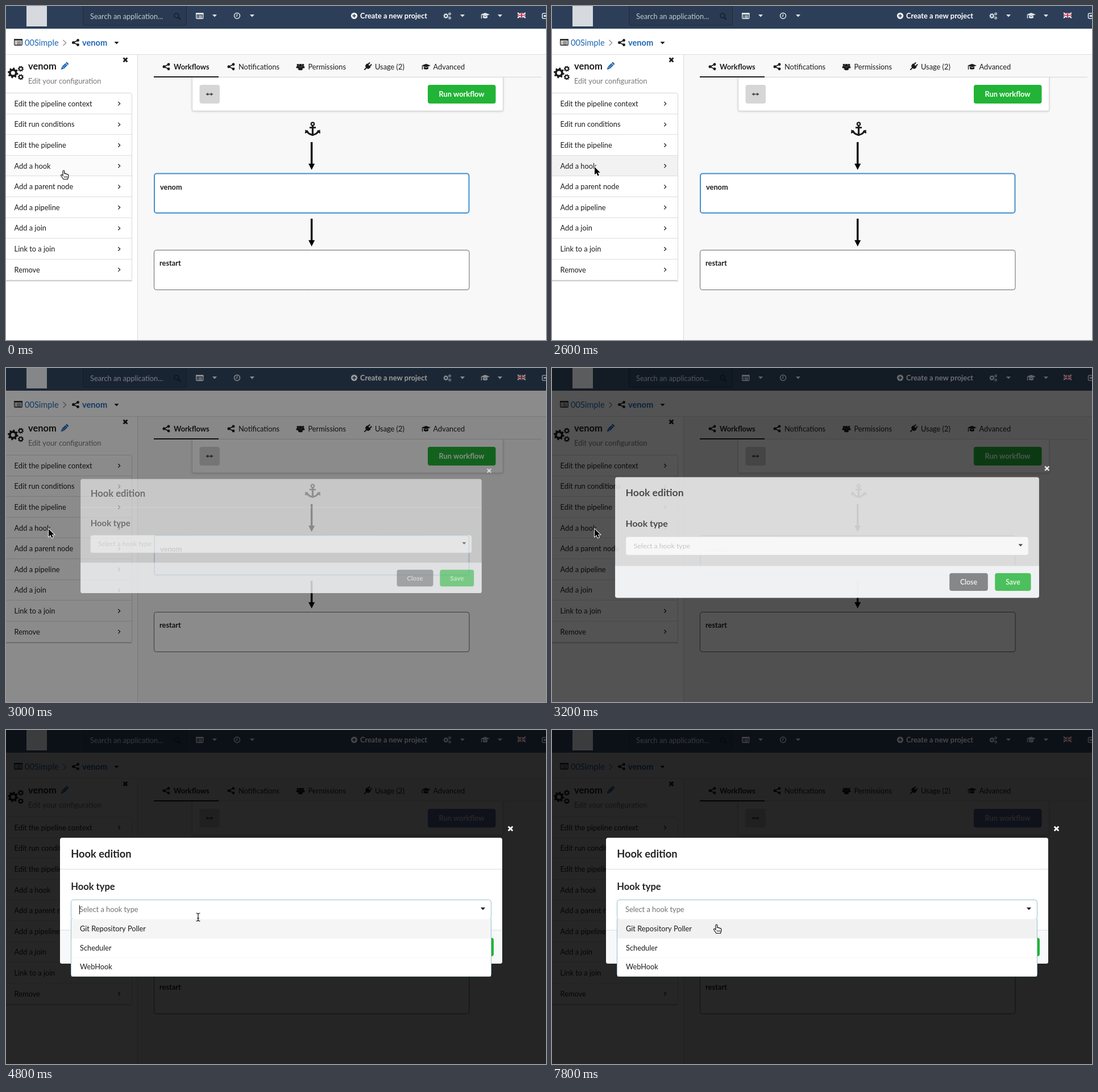
An HTML page with a canvas that plays this animation: 950 px wide and 589 px high, repeating every 8000 ms.

```html
<!DOCTYPE html>
<html lang="en">
<head>
<meta charset="utf-8">
<title>Workflow hook</title>
<style>
html, body { margin: 0; width: 100%; height: 100%; overflow: hidden; background: #f8f8f8; }
canvas { display: block; }
</style>
</head>
<body>
<canvas id="stage" width="950" height="589"></canvas>
<script>
const ctx = document.getElementById('stage').getContext('2d');
const LOOP = 8000, STEP = 200, TAU = Math.PI * 2;
const INK = '#1c1c1d', BLUE = '#1e66b4', GREEN = '#21b436', PALE = '#dfe4ea';
const MENU = ['Edit the pipeline context', 'Edit run conditions', 'Edit the pipeline', 'Add a hook',
  'Add a parent node', 'Add a pipeline', 'Add a join', 'Link to a join', 'Remove'];
const HOOKS = ['Git Repository Poller', 'Scheduler', 'WebHook'];
const ROW = 36.6;

// Pointer hot spot: time, x, y
const POINTER = [
  [0, 102, 290], [200, 101, 290], [1200, 75, 284], [3400, 75, 284], [4400, 336, 328],
  [4800, 338, 330], [5200, 325, 345], [5900, 303, 410], [6200, 300, 410], [6600, 297, 395],
  [7000, 294, 378], [7600, 290, 345], [7800, 290, 343], [8000, 290, 343]];

const clamp = v => Math.max(0, Math.min(1, v));

function pointerAt(t) {
  let i = 1;
  while (i < POINTER.length - 1 && POINTER[i][0] < t) i++;
  const [t0, x0, y0] = POINTER[i - 1], [t1, x1, y1] = POINTER[i];
  const u = clamp((t - t0) / (t1 - t0)), s = u * u * (3 - 2 * u);
  return [x0 + (x1 - x0) * s, y0 + (y1 - y0) * s];
}

function rect(x, y, w, h, color) {
  ctx.fillStyle = color;
  ctx.fillRect(x, y, w, h);
}

function box(x, y, w, h, r, fill, stroke, line = 1) {
  ctx.beginPath();
  ctx.roundRect(x, y, w, h, r);
  if (fill) { ctx.fillStyle = fill; ctx.fill(); }
  if (stroke) { ctx.strokeStyle = stroke; ctx.lineWidth = line; ctx.stroke(); }
}

function text(s, x, y, color = INK, size = 12.8, weight = 400, align = 'left') {
  ctx.font = `${weight} ${size}px Lato, sans-serif`;
  ctx.textAlign = align;
  ctx.fillStyle = color;
  ctx.fillText(s, x, y);
}

function path(points, color, fill = true, width = 1) {
  ctx.beginPath();
  for (let i = 0; i < points.length; i += 2) ctx.lineTo(points[i], points[i + 1]);
  if (fill) {
    ctx.closePath();
    ctx.fillStyle = color;
    ctx.fill();
  } else {
    ctx.strokeStyle = color;
    ctx.lineWidth = width;
    ctx.stroke();
  }
}

function dot(x, y, r, color) {
  ctx.beginPath();
  ctx.arc(x, y, r, 0, TAU);
  ctx.fillStyle = color;
  ctx.fill();
}

function ring(x, y, r, color, width) {
  ctx.beginPath();
  ctx.arc(x, y, r, 0, TAU);
  ctx.strokeStyle = color;
  ctx.lineWidth = width;
  ctx.stroke();
}

function at(x, y, draw, angle = 0) {
  ctx.save();
  ctx.translate(x, y);
  ctx.rotate(angle);
  draw();
  ctx.restore();
}

const caret = (x, y, color = INK) => path([x - 4, y - 2, x + 4, y - 2, x, y + 2.5], color);
const chevron = (x, y, r, color, w) => path([x - r / 2, y - r, x + r / 2, y, x - r / 2, y + r], color, false, w);

function cross(x, y, r, color) {
  path([x - r, y - r, x + r, y + r], color, false, 2.8);
  path([x + r, y - r, x - r, y + r], color, false, 2.8);
}

function gear(x, y, r, color) {
  ctx.beginPath();
  for (let i = 0; i < 32; i++) {
    const a = (i + .5) * TAU / 32, d = i % 4 < 2 ? r : r * .76;
    ctx.lineTo(x + d * Math.cos(a), y + d * Math.sin(a));
  }
  ctx.closePath();
  ctx.moveTo(x + r * .38, y);
  ctx.arc(x, y, r * .38, 0, TAU);
  ctx.fillStyle = color;
  ctx.fill('evenodd');
}

function gears(x, y, s, color) {
  gear(x - 4 * s, y, 9 * s, color);
  gear(x + 9 * s, y - 7 * s, 5 * s, color);
  gear(x + 9 * s, y + 7 * s, 5 * s, color);
}

function share(x, y) {
  path([x + 4, y - 4, x - 4, y, x + 4, y + 4], INK, false, 1.8);
  dot(x - 4, y, 2.5, INK);
  dot(x + 4, y - 4, 2.4, INK);
  dot(x + 4, y + 4, 2.4, INK);
}

function listIcon(x, y, w, h, color) {
  box(x + .7, y + .7, w - 1.4, h - 1.4, 1.5, null, color, 1.4);
  rect(x, y, w, 3, color);
  for (let i = 0; i < 3; i++) {
    const ly = y + 4.4 + i * (h - 5) / 3;
    rect(x + 2.5, ly, 1.5, 1.2, color);
    rect(x + 5, ly, w - 7.5, 1.2, color);
  }
}

function cap(x, y, color) {
  path([x - 8, y - 2, x, y - 5, x + 8, y - 2, x, y + 1], color);
  path([x - 4, y, x, y + 2, x + 4, y, x + 4, y + 4, x, y + 5, x - 4, y + 4], color);
  path([x - 6.5, y - 1, x - 6.5, y + 5], color, false, 1.4);
}

function users(x, y) {
  for (const [dx, dy, r] of [[-4.5, -3, 2], [4.5, -3, 2], [0, -2.2, 2.9]]) {
    dot(x + dx, y + dy, r, INK);
    box(x + dx - r - 1, y + dy + r, (r + 1) * 2, r * 1.9, 2, INK);
  }
}

function plug(x, y) {
  at(x, y, () => {
    rect(-3.2, -8, 2, 5, INK);
    rect(1.2, -8, 2, 5, INK);
    box(-4.5, -3.5, 9, 6.5, [0, 0, 4, 4], INK);
    rect(-1, 2, 2, 6, INK);
  }, Math.PI / 4);
}

function pencil(x, y) {
  at(x, y, () => {
    rect(-2.6, -8, 5.2, 2.6, BLUE);
    rect(-2.6, -4.6, 5.2, 8.4, BLUE);
    path([-2.6, 4.2, 2.6, 4.2, 0, 9], BLUE);
    rect(-.4, -4, .8, 7, '#8fb8e4');
  }, Math.PI / 4);
}

function anchor(x, y) {
  ring(x, y - 9, 2.7, INK, 2.2);
  rect(x - 1.6, y - 6, 3.2, 18, INK);
  rect(x - 5.5, y - 4, 11, 2.8, INK);
  ctx.beginPath();
  ctx.arc(x, y - 1, 11, .3, Math.PI - .3);
  ctx.strokeStyle = INK;
  ctx.lineWidth = 3;
  ctx.stroke();
  for (const d of [-1, 1]) path([x + d * 13.5, y + 8, x + d * 13, y + 1, x + d * 6.5, y + 5], INK);
}

function downArrow(x, top, tip) {
  rect(x - 1.7, top, 3.4, tip - top - 8, '#000');
  path([x - 5.5, tip - 11, x + 5.5, tip - 11, x, tip], '#000');
}

function header() {
  rect(0, 0, 950, 40, '#2d3f58');
  rect(36, 0, 36, 36, '#d6d9dd');
  box(135.5, -4, 182, 38, 3, '#293a52', '#1d2a3c');
  text('Search an application...', 148, 23, '#c3cad3');
  ring(300, 17, 4, '#141d2a', 1.5);
  path([303, 20, 307, 24], '#141d2a', false, 1.8);
  listIcon(334, 12, 13.5, 11, PALE);
  ring(406.5, 17.3, 5, PALE, 1.5);
  path([406.5, 14, 406.5, 18, 404, 18], PALE, false, 1.2);
  for (const x of [367, 433, 803, 869]) caret(x, 17, PALE);
  dot(612.5, 17.3, 5.6, '#fff');
  rect(609.3, 16.5, 6.4, 1.7, '#2d3f58');
  rect(611.7, 14.1, 1.7, 6.4, '#2d3f58');
  text('Create a new project', 623, 22, '#fff', 12.8, 700);
  gears(776, 17.5, .52, PALE);
  cap(843, 17, PALE);
  rect(900, 12, 14, 9, '#34427f');
  path([900, 12, 914, 21], '#fff', false, 2);
  path([914, 12, 900, 21], '#fff', false, 2);
  rect(905.2, 12, 3.6, 9, '#fff');
  rect(900, 14.8, 14, 3.4, '#fff');
  rect(906, 12, 2, 9, '#d0313f');
  rect(900, 15.6, 14, 1.8, '#d0313f');
  box(943.5, 13, 9, 9, 2, null, PALE, 1.6);
  rect(946, 16, 4, 3, PALE);
}

function breadcrumb() {
  rect(0, 40, 950, 45, '#fff');
  rect(0, 85, 950, 1, '#dedede');
  listIcon(14, 58, 15, 12, '#333');
  text('00Simple', 33, 70, BLUE, 14.6);
  chevron(103, 65, 5, '#999', 1.6);
  share(122.5, 64.5);
  text('venom', 134, 70, BLUE, 14.6, 700);
  caret(194.5, 65);
}

function sidebar(glow) {
  rect(0, 86, 231, 503, '#fff');
  rect(231, 86, 1, 503, '#d9d9d9');
  gears(16.5, 118, 1.05, INK);
  text('venom', 39, 112, INK, 16.5, 700);
  pencil(103, 106);
  cross(210, 95, 3.4, INK);
  text('Edit your configuration', 39, 137, '#777');
  rect(0, 484, 222, 1.5, '#ccc');
  box(-4, 153.5, 225.5, 330, 3, '#fff', '#d6d6d7');
  MENU.forEach((label, i) => {
    const y = 154 + i * ROW;
    if (i === 3) rect(0, y, 221, ROW, glow);
    if (i) rect(0, Math.round(y) - 1, 221, 1, '#dededf');
    text(label, 14.6, y + 22.7);
    chevron(199, y + 18.3, 3.3, '#222', 1.3);
  });
}

function workflow(dim) {
  rect(260, 125, 682, 1, '#d4d4d5');
  rect(260, 124, 114, 2, INK);
  share(282, 107);
  text('Workflows', 295, 112, INK, 12.8, 700);
  share(396, 107);
  text('Notifications', 409, 112);
  users(518, 107);
  text('Permissions', 531.5, 112);
  plug(636, 107);
  text('Usage (2)', 649, 112);
  cap(739, 107, INK);
  text('Advanced', 751.5, 112);

  ctx.save();
  ctx.beginPath();
  ctx.rect(320, 126, 562, 70);
  ctx.clip();
  ctx.shadowColor = 'rgba(0,0,0,.18)';
  ctx.shadowBlur = 4;
  ctx.shadowOffsetY = 1;
  box(327.5, 118, 547, 67, 4, '#fff');
  ctx.restore();
  ctx.beginPath();
  ctx.moveTo(327.5, 126);
  ctx.lineTo(327.5, 185);
  ctx.lineTo(874.5, 185);
  ctx.lineTo(874.5, 126);
  ctx.strokeStyle = '#d4d4d5';
  ctx.lineWidth = 1;
  ctx.stroke();
  box(340.5, 139, 35.5, 33, 4, '#d6d6d7');
  rect(354, 154.8, 8, 1.5, '#444');
  path([351.5, 155.5, 355.5, 152.8, 355.5, 158.2], '#444');
  path([364.5, 155.5, 360.5, 152.8, 360.5, 158.2], '#444');
  box(742, 139, 119.5, 33, 4, dim > .8 ? '#6a76b8' : GREEN);
  text('Run workflow', 801.5, 160, '#fff', 12.8, 700, 'center');

  anchor(539.5, 217);
  downArrow(537.7, 240, 289);
  box(261, 295.5, 553.5, 69.5, 4, '#fff', '#4290d0', 2);
  text('venom', 271, 323.5, INK, 12.8, 700);
  downArrow(537.7, 375, 424);
  box(260.5, 430.5, 554.5, 70, 4, '#fff', '#666');
  text('restart', 270, 458, INK, 12.8, 700);
}

function modal(open) {
  cross(887.5, 174, 3.8, '#fff');
  box(95, 190, 778, 222, 4, '#fff');
  rect(95, 245, 778, 1, '#dcdcdd');
  box(95, 353, 778, 59, [0, 0, 4, 4], '#f6f8fa');
  rect(95, 352.5, 778, 1, '#dcdcdd');
  text('Hook edition', 114.3, 224.5, '#222', 18.3, 700);
  text('Hook type', 114.3, 281.5, '#222', 16.5, 700);
  box(708.5, 366.5, 70.5, 32.5, 4, '#6b6c6e');
  text('Close', 743.7, 387.3, '#fff', 12.8, 700, 'center');
  box(792, 366.5, 66, 32.5, 4, GREEN);
  text('Save', 825, 387.3, '#fff', 12.8, 700, 'center');
  box(114.5, 299.5, 739, 34, 4, '#fff', open ? '#96c0c8' : '#d8d9da');
  text('Select a hook type', 129, 321, open ? '#727272' : '#b8b8b8');
  caret(839, 315);
}

function dropdown(open, hovered, caretOn) {
  if (open <= 0) return;
  ctx.save();
  ctx.beginPath();
  ctx.rect(114, 333, 740, 103 * open);
  ctx.clip();
  ctx.globalAlpha = open;
  box(114.5, 325, 739, 109.5, [0, 0, 4, 4], '#fff', '#96c0c8');
  HOOKS.forEach((label, i) => {
    const y = 333.5 + i * 33.7;
    const fill = i === hovered ? '#f1f1f1' : i === 0 ? '#f5f5f5' : '#fff';
    rect(115, y, 738, 33.6, fill);
    if (i) rect(115, y, 738, 1, '#f7f7f7');
    text(label, 130, y + 21.5);
  });
  ctx.restore();
  if (caretOn) rect(129, 309, 1, 16, '#111');
}

function arrowPointer() {
  const shape = new Path2D('M0 0V13.5L3.2 10.6L5.5 15.6L7.8 14.6L5.6 9.7H9.8Z');
  ctx.strokeStyle = '#fff';
  ctx.lineWidth = 1.8;
  ctx.stroke(shape);
  ctx.fillStyle = '#000';
  ctx.fill(shape);
}

function handPointer() {
  const shape = new Path2D('M-2 7V1.5Q-2 0 -.6 0Q.8 0 .8 1.5V5.5Q2 4.8 3 6Q4.3 5.4 5.2 6.7Q7.6 6.2 7.8 8.5V11Q7 13.5 6.5 15.5H-1Q-2.5 13-4.8 10Q-6 8-4.5 7.5Q-3.3 7.4-2 9.2Z');
  ctx.fillStyle = '#fff';
  ctx.fill(shape);
  ctx.strokeStyle = '#111';
  ctx.lineWidth = 1.2;
  ctx.stroke(shape);
  for (const x of [.8, 3, 5.2]) path([x, 10, x, 13], '#111', false, .9);
}

function beamPointer() {
  const shape = new Path2D('M-3.5 -7Q0 -7 0 -5Q0 -7 3.5 -7M0 -5.5V5.5M-3.5 7Q0 7 0 5Q0 7 3.5 7M-2 2H2');
  for (const [color, width] of [['#fff', 3], ['#111', 1.2]]) {
    ctx.strokeStyle = color;
    ctx.lineWidth = width;
    ctx.stroke(shape);
  }
}

function render(t) {
  const rest = 1 - clamp((t - 2720) / 880), shown = 1 - rest * rest;
  const open = clamp((t - 4420) / 300);
  const [px, py] = pointerAt(t);
  const hovered = open && py > 334 ? Math.floor((py - 333.5) / 33.7) : -1;

  rect(0, 0, 950, 589, '#f8f8f8');
  header();
  breadcrumb();
  sidebar(t < 200 ? '#fbfbfb' : t < 2800 ? '#f2f2f2' : '#fff');
  workflow(shown);

  if (shown > 0) {
    rect(0, 0, 950, 40, `rgba(0,0,0,${.72 * shown})`);
    rect(0, 40, 950, 549, `rgba(0,0,0,${.85 * shown})`);
    const scale = .8 + .2 * shown;
    ctx.save();
    ctx.globalAlpha = shown;
    ctx.translate(484, 301 - 10 * rest * rest);
    ctx.scale(scale, scale);
    ctx.translate(-484, -301);
    modal(open > 0);
    ctx.restore();
    dropdown(open, hovered, (t - 4550) % 900 < 450);
  }

  const overField = t > 3600 && px > 114 && py > 299 && py < 334;
  const onHand = t < 2400 || hovered >= 0;
  at(px, py, overField ? beamPointer : onHand ? handPointer : arrowPointer);
}

function tick() {
  const t = performance.now() % LOOP;
  render(Math.floor(t / STEP) * STEP);
  requestAnimationFrame(tick);
}
tick();
</script>
</body>
</html>
```
